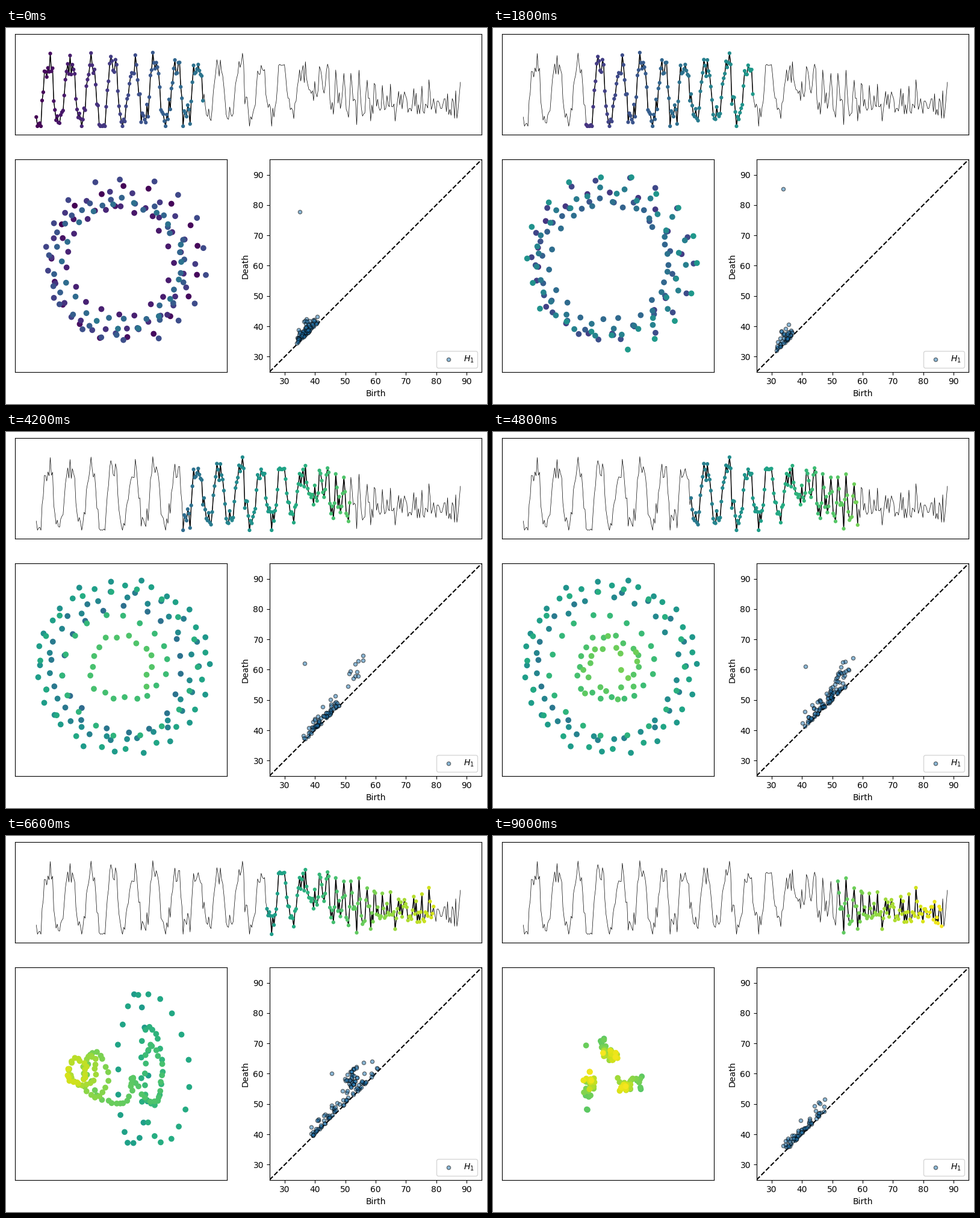
Animation, 799 px wide and 624 px high, one loop 9600 ms. Source, as a matplotlib script:

```python
import numpy as np
import matplotlib.pyplot as plt
from matplotlib.animation import FuncAnimation

W, H, DPI = 799, 624, 100
FRAMES, STEP, WINDOW = 16, 18, 144
N, LAST = 365, 360
TURN = 19.46          # degrees the orbit advances per sample
SAMPLES = np.arange(N)

# Key points: (sample, distance from the middle) of the orbit
RADII = [(0, 122), (5, 130), (16, 118), (24, 82), (40, 95), (56, 124), (66, 110), (78, 147),
         (88, 126), (98, 100), (107, 117), (119, 96), (138, 100), (152, 128), (176, 112),
         (187, 147), (228, 131), (240, 98), (253, 58), (265, 42), (360, 38)]

# Key points: (sample, middle x, middle y, width, height) of the unfolding orbit
UNFOLD = [(198, 205, 388, 32, 130), (213, 212, 386, 25, 120), (220, 260, 383, 45, 130),
          (228, 262, 383, 38, 122), (234, 243, 385, 18, 62), (262, 246, 402, 12, 40),
          (277, 185, 440, 12, 8), (288, 149, 396, 20, 38), (305, 148, 398, 20, 36),
          (320, 118, 390, 15, 20)]

# Key points: frame, low count, births from and to, high count, outlier birth and death
DIAGRAM = [(0, 74, 33.5, 41, 0, 34.9, 77.8), (3, 40, 31.3, 37, 0, 33.7, 85.3),
           (5, 27, 32, 45, 0, 35.7, 87.4), (7, 66, 35.5, 48, 11, 36.5, 62),
           (9, 84, 43.8, 63, 34, 45.6, 60.1), (11, 74, 38, 61, 34, 45.6, 60.1),
           (15, 62, 33.5, 48, 0, 46, 50.2)]


def keyed(keys, at):
    where, *columns = np.transpose(keys)
    return [np.interp(at, where, column) for column in columns]


def build_series():
    rng = np.random.default_rng(12)
    season = np.tanh(1.8 * np.cos(2 * np.pi * (SAMPLES - 10.8) / 18.2))
    strength = np.interp(SAMPLES, [0, 210, 235, 265], [44, 44, 22, 0])
    spikes = np.maximum(0, np.cos(2 * np.pi * (SAMPLES - 257) / 6.7)) ** 2
    burst = np.interp(SAMPLES, [235, 257, 364], [0, 60, 18])
    middle = np.interp(SAMPLES, [0, 200, 235, 270, 364], [108, 106, 92, 131, 134])
    noise = rng.normal(0, 1, N) * np.interp(SAMPLES, [0, 364], [13, 10])
    return np.clip(middle - strength * season - burst * spikes + noise, 24, 163)


def ellipse(cx, cy, rx, ry, degrees):
    angle = np.radians(degrees)
    return np.column_stack([cx + rx * np.cos(angle), cy + ry * np.sin(angle)])


rng = np.random.default_rng(9)
SERIES = build_series()
WOBBLE = rng.normal(0, 1, (2, N))
RADIUS = keyed(RADII, SAMPLES)[0] + WOBBLE[0] * np.interp(SAMPLES, [0, 255, 270], [3, 3, 9])


def cloud_points(frame, window):
    wobble = WOBBLE[:, window]
    if frame in (11, 12):
        cx, cy, rx, ry = keyed(UNFOLD, window)
        return ellipse(cx, cy, rx, ry, TURN * (window - 220) - 5) + 1.5 * wobble.T
    if frame > 12:
        radius = np.interp(window, [234, 270, 312, 360], [110, 62, 30, 36]) + 5 * wobble[0]
        drift = np.interp(window, [270, 360], [12, 46])
        return ellipse(191, 395, radius, radius, 120 * window + drift + 11 * wobble[1])
    degrees = 261 + TURN * (window - 77) + 10 * np.exp(-frame / 2) + 1.5 * wobble[1]
    return ellipse(193, 391, RADIUS[window], RADIUS[window], degrees)


def diagram_points(frame):
    rng = np.random.default_rng(30 + frame)
    low, start, stop, high, *outlier = keyed(DIAGRAM, frame)
    low, high = int(low), int(high)
    birth = np.concatenate([start + (stop - start) * rng.beta(1.4, 1.6, low),
                            rng.normal(52.5, 1.6, high)])
    life = np.concatenate([0.2 + np.minimum(rng.exponential(1.5, low), 5),
                           rng.uniform(3.5, 9, high)])
    return np.vstack([np.column_stack([birth, birth + life]), outlier])


fig = plt.figure(figsize=(W / DPI, H / DPI), dpi=DPI, facecolor="white")
LEFT, FULL = 15.05, 775
SIDE = FULL / 2.2


def panel(left, top, width, height, pixels=True):
    ax = fig.add_axes([left / W, 1 - (top + height) / H, width / W, height / H])
    if pixels:
        ax.set(xlim=(left, left + width), ylim=(top + height, top), xticks=[], yticks=[])
    return ax


def index_dots(ax, size):
    return ax.scatter([], [], s=size, c=[], cmap="viridis", vmin=0, vmax=N - 1, zorder=3)


top_ax = panel(LEFT, 10.2, FULL, 167)
cloud_ax = panel(LEFT, 218.35, SIDE, SIDE)
pd_ax = panel(LEFT + FULL - SIDE, 218.35, SIDE, SIDE, pixels=False)

X = np.linspace(50.3, 754.8, N)
top_ax.plot(X, SERIES, color="black", lw=0.5)
bold_line, = top_ax.plot([], [], color="black", lw=1)
series_dots = index_dots(top_ax, 12)
cloud_dots = index_dots(cloud_ax, 36)

pd_ax.plot([25, 95], [25, 95], "--", color="black", lw=1.5)
pd_dots = pd_ax.scatter([], [], s=20, color="C0", edgecolors="black", linewidths=1,
                        alpha=0.5, label="$H_1$", zorder=3)
ticks = range(30, 91, 10)
pd_ax.set(xlim=(25, 95), ylim=(25, 95), xticks=ticks, yticks=ticks,
          xlabel="Birth", ylabel="Death")
pd_ax.legend(loc="lower right")


def update(frame):
    start = frame * STEP
    window = np.arange(start, min(start + WINDOW, LAST))
    bold_line.set_data(X[window], SERIES[window])
    series_dots.set_offsets(np.column_stack([X[window], SERIES[window]]))
    cloud_dots.set_offsets(cloud_points(frame, window))
    for dots in (series_dots, cloud_dots):
        dots.set_array(window)
    pd_dots.set_offsets(diagram_points(frame))
    return bold_line, series_dots, cloud_dots, pd_dots


anim = FuncAnimation(fig, update, frames=FRAMES, interval=600, repeat=True, repeat_delay=0)
plt.show()
```
